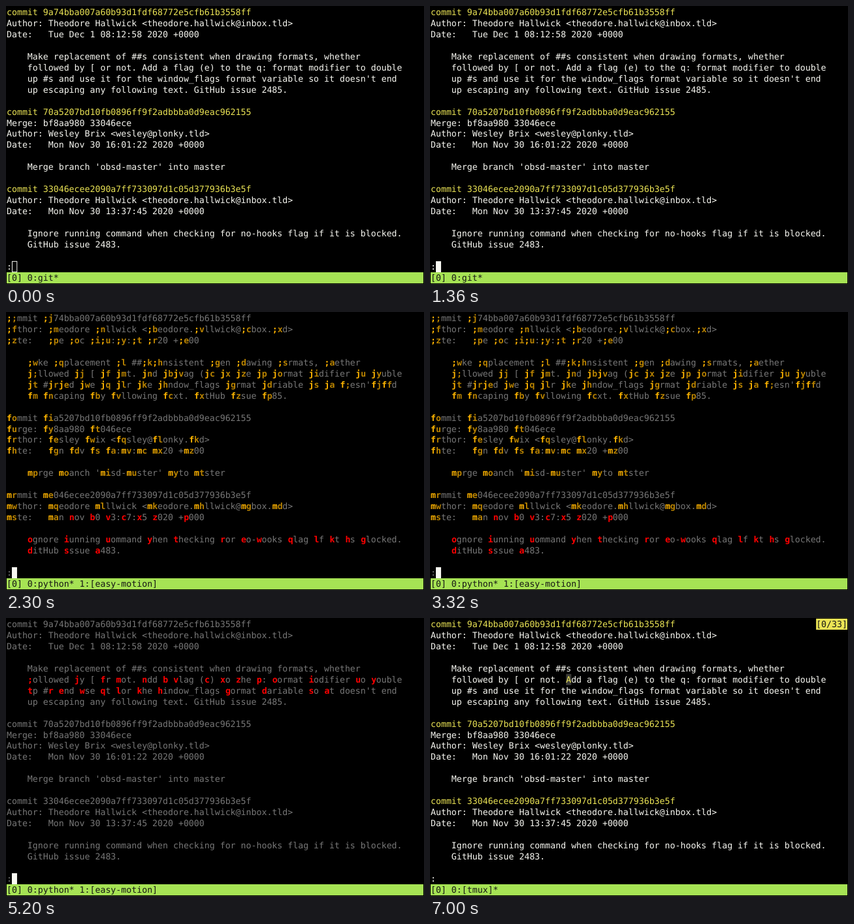
An HTML page that plays this animation: 640x426 px, repeating every 8000 ms.

```html
<!DOCTYPE html>
<html lang="en">
<head>
<meta charset="utf-8">
<title>Terminal jump hints</title>
<style>
  html, body { margin: 0; width: 100%; height: 100%; overflow: hidden; background: #000; }
  svg { display: block; width: 100vw; height: 100vh; }
  text {
    font-family: "DejaVu Sans Mono", monospace;
    white-space: pre;
    text-rendering: geometricPrecision;
  }
</style>
</head>
<body>
<svg id="screen" viewBox="0 0 640 426"></svg>
<script>
const LOOP = 8000;
const PAD = 1, COLS = 80, ROWS = 25;
const CELL_W = (640 - 2 * PAD) / COLS;
const CELL_H = (426 - 2 * PAD) / ROWS;
const FONT_SIZE = CELL_W / 0.60205;
const BASELINE = 12.9;

const COLOR = {
  text: '#f8f8f2', dim: '#777777', yellow: '#ebe455', green: '#a6e354',
  ink: '#151515', cursor: '#f8f8f2', first: '#ffb400', second: '#b98300',
  target: '#ff0000', faded: '#3c3c38'
};

const LOG = `commit 9a74bba007a60b93d1fdf68772e5cfb61b3558ff
Author: Theodore Hallwick <theodore.hallwick@inbox.tld>
Date:   Tue Dec 1 08:12:58 2020 +0000

    Make replacement of ##s consistent when drawing formats, whether
    followed by [ or not. Add a flag (e) to the q: format modifier to double
    up #s and use it for the window_flags format variable so it doesn't end
    up escaping any following text. GitHub issue 2485.

commit 70a5207bd10fb0896ff9f2adbbba0d9eac962155
Merge: bf8aa980 33046ece
Author: Wesley Brix <wesley@plonky.tld>
Date:   Mon Nov 30 16:01:22 2020 +0000

    Merge branch 'obsd-master' into master

commit 33046ecee2090a7ff733097d1c05d377936b3e5f
Author: Theodore Hallwick <theodore.hallwick@inbox.tld>
Date:   Mon Nov 30 13:37:45 2020 +0000

    Ignore running command when checking for no-hooks flag if it is blocked.
    GitHub issue 2483.

:`.split('\n');

// Every word start is a jump target; early ones need two keys, the last only one.
const KEYS = [...';jfmnbvcxzpoiuytrewqlkhgdsa'];
const HINTS = [
  ...[';', 'j', 'f'].flatMap(p => KEYS.map(k => p + k)),
  ...KEYS.slice(6).map(k => 'm' + k),
  ...KEYS.slice(4)
];
const TARGETS = LOG.flatMap((line, row) =>
  [...line.matchAll(/\b\w/g)].map(m => ({ row, col: m.index })))
  .map((t, i) => ({ ...t, hint: HINTS[i] }));

const PROMPT = { row: 23, col: 1 };
const JUMP = { row: 5, col: 26 };

const SCENES = [
  { at: 0, status: '0:git*', prompt: 'outline' },
  { at: 100, status: '0:git*', prompt: 'block' },
  { at: 2200, status: '0:git* 1:[easy-motion]', prompt: 'block' },
  { at: 2300, status: '0:python* 1:[easy-motion]', prompt: 'block', hints: '' },
  { at: 4000, status: '0:python* 1:[easy-motion]', prompt: 'block', hints: 'j' },
  { at: 6000, status: '0:git*', jump: [COLOR.cursor, COLOR.ink] },
  { at: 7000, status: '0:[tmux]*', jump: [COLOR.faded, COLOR.yellow] }
];

const screen = document.getElementById('screen');

function add(name, attrs, content = '') {
  const el = document.createElementNS('http://www.w3.org/2000/svg', name);
  for (const key in attrs) el.setAttribute(key, attrs[key]);
  el.textContent = content;
  screen.append(el);
}

const left = col => PAD + col * CELL_W;
const top_ = row => PAD + row * CELL_H;

function write(row, col, content, fill, bold) {
  add('text', {
    x: left(col), y: top_(row) + BASELINE, fill,
    'font-size': FONT_SIZE, 'font-weight': bold ? 700 : 400
  }, content);
}

function block(row, col, span, fill) {
  add('rect', { x: left(col), y: top_(row), width: span * CELL_W, height: CELL_H, fill });
}

// Hint letters per row, keyed by column, for the keys typed so far.
function hintCells(typed) {
  const rows = LOG.map(() => new Map());
  for (const { row, col, hint } of TARGETS) {
    if (!hint.startsWith(typed)) continue;
    const rest = hint.slice(typed.length);
    [...rest].forEach((char, i) => rows[row].set(col + i, {
      char,
      fill: rest.length === 1 ? COLOR.target : i ? COLOR.second : COLOR.first
    }));
  }
  return rows;
}

function drawHints(typed) {
  hintCells(typed).forEach((cells, row) => {
    const plain = [...LOG[row]].map((c, col) => cells.has(col) ? ' ' : c).join('');
    write(row, 0, plain, COLOR.dim);
    cells.forEach(({ char, fill }, col) => write(row, col, char, fill, true));
  });
}

function drawLog() {
  LOG.forEach((line, row) =>
    write(row, 0, line, line.startsWith('commit') ? COLOR.yellow : COLOR.text));
}

function drawPrompt(kind) {
  if (kind === 'block') block(PROMPT.row, PROMPT.col, 1, COLOR.cursor);
  if (kind === 'outline') add('rect', {
    x: left(PROMPT.col) + 0.5, y: top_(PROMPT.row) + 0.3,
    width: CELL_W - 0.7, height: CELL_H - 0.8,
    fill: 'none', stroke: COLOR.cursor
  });
}

function drawJump([back, fill]) {
  block(JUMP.row, JUMP.col, 1, back);
  write(JUMP.row, JUMP.col, LOG[JUMP.row][JUMP.col], fill);
  block(0, 74, 6, COLOR.yellow);
  write(0, 74, '[0/33]', COLOR.ink);
}

function draw(scene) {
  screen.replaceChildren();
  add('rect', { width: 640, height: 426, fill: '#000' });
  if (scene.hints === undefined) drawLog();
  else drawHints(scene.hints);
  drawPrompt(scene.prompt);
  if (scene.jump) drawJump(scene.jump);
  block(24, 0, COLS, COLOR.green);
  write(24, 0, '[0] ' + scene.status, COLOR.ink);
}

let shown;
const start = performance.now();

function update() {
  const time = (performance.now() - start) % LOOP;
  const scene = SCENES.findLast(s => s.at <= time);
  if (scene !== shown) draw(shown = scene);
  requestAnimationFrame(update);
}
update();
</script>
</body>
</html>
```
